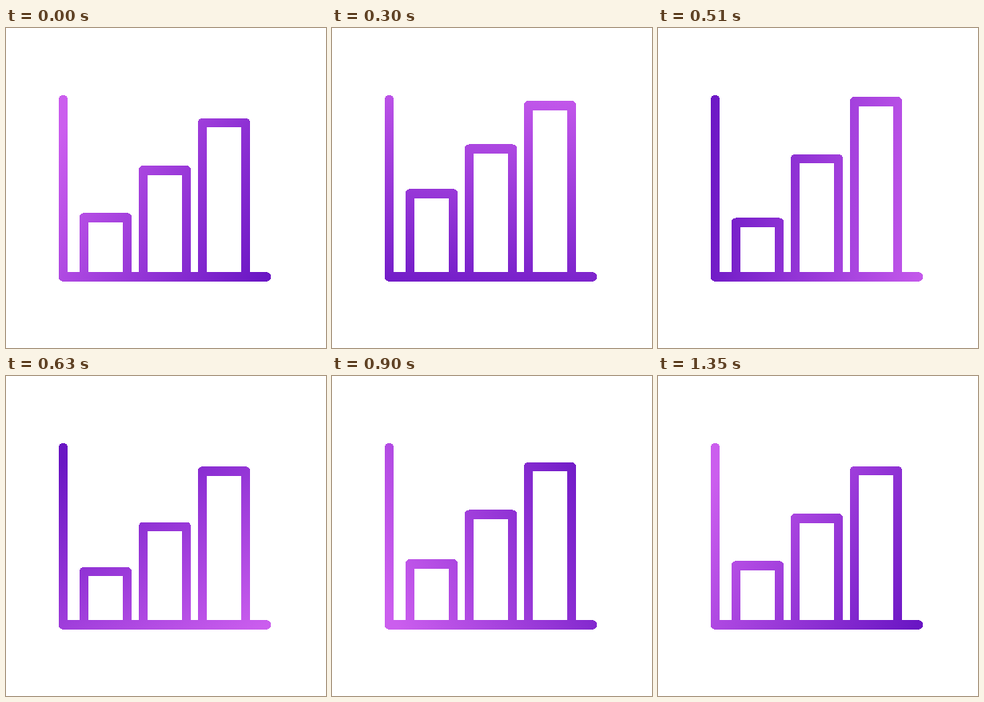
Animation, 400 px wide and 400 px high, one loop 3.44 s. Source, as an HTML page:

```html
<!DOCTYPE html>
<html lang="en">
<head>
<meta charset="utf-8">
<title>Bar chart</title>
<style>
  html, body { margin: 0; height: 100%; overflow: hidden; background: #fff; }
  svg { display: block; width: 100vw; height: 100vh; }
</style>
</head>
<body>
<svg viewBox="0 0 400 400">
  <linearGradient id="ink" gradientUnits="userSpaceOnUse">
    <stop offset="0" stop-color="#cb5eee"/>
    <stop offset="1" stop-color="#6a16c4"/>
  </linearGradient>
  <path id="chart" fill="none" stroke="url(#ink)" stroke-width="11.6"
    stroke-linecap="round" stroke-linejoin="round" shape-rendering="crispEdges"/>
</svg>
<script>
const LOOP = 3440, STEP = 30, SPIN = 1250, SETTLE = 1300;
const BASE = 311, LIFT = 30, SWINGS = 5;
const PEAKS = [297, 393, 460]; // when each bar is tallest
const ink = document.getElementById('ink');
const chart = document.getElementById('chart');

const ease = u => (1 - Math.cos(Math.PI * u)) / 2;

// Damped bounce: tallest after one swing, at rest after SWINGS.
function bounce(t, peak, decay) {
  if (t >= SETTLE) return 0;
  const phase = SWINGS ** (Math.log(t / peak) / Math.log(SETTLE / peak));
  const n = Math.floor(phase), u = phase - n;
  if (n === 0) return -LIFT * Math.sin(Math.PI / 2 * u);
  const from = -LIFT * (-decay) ** (n - 1);
  const to = n + 1 < SWINGS ? -decay * from : 0;
  return from + (to - from) * ease(u);
}

function draw(t) {
  const turn = ease(Math.min(t / SPIN, 1) ** 0.88);
  const angle = (210 + 360 * turn) * Math.PI / 180;
  const dx = 155 * Math.cos(angle), dy = 155 * Math.sin(angle);
  const ends = { x1: 205 + dx, y1: 206 + dy, x2: 205 - dx, y2: 206 - dy };
  for (const name in ends) ink.setAttribute(name, ends[name]);

  let d = `M71.5 89.5V${BASE}H325.5`;
  PEAKS.forEach((peak, i) => {
    const top = 237 - 59.2 * i + bounce(t, peak, 0.33 + 0.065 * i);
    d += `M${97.5 + 74 * i} ${BASE}V${top}h54V${BASE}`;
  });
  chart.setAttribute('d', d);
}

const start = performance.now();
function tick() {
  const t = (performance.now() - start) % LOOP;
  draw(Math.floor(t / STEP) * STEP);
  requestAnimationFrame(tick);
}
tick();
</script>
</body>
</html>
```
